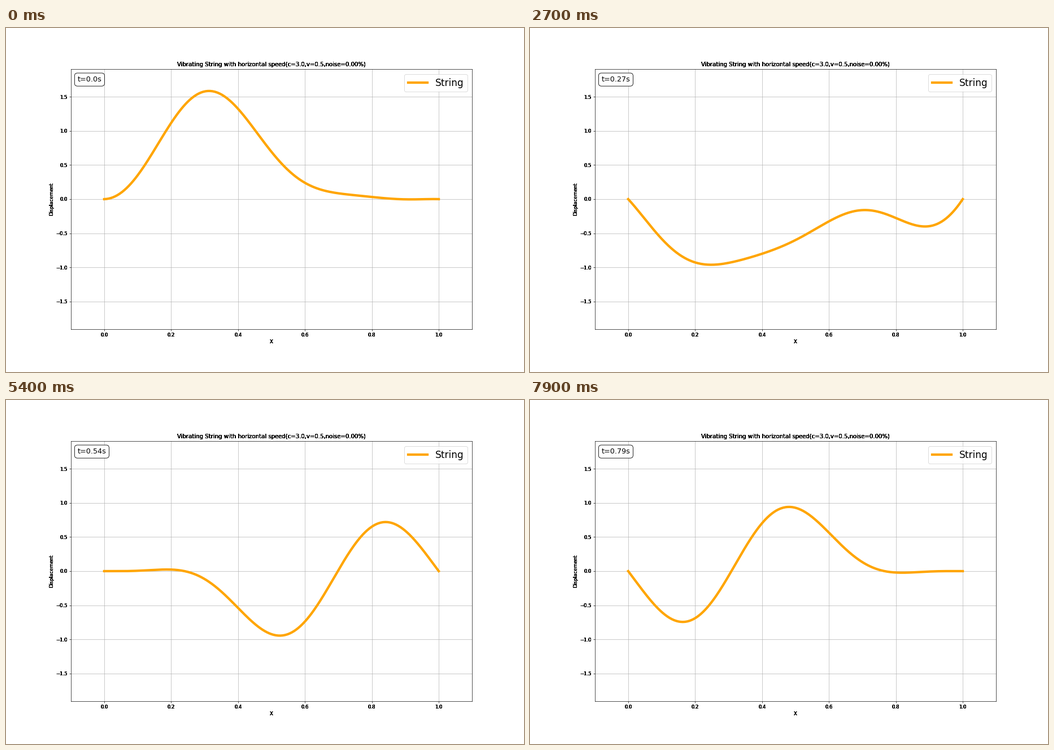
Animation, 917 px wide and 611 px high, one loop 8 s. Source, as a matplotlib script:

```python
import numpy as np
import matplotlib.pyplot as plt
from matplotlib.animation import FuncAnimation

DPI = 61.1
W, H = 917, 611
FRAMES, INTERVAL = 80, 100

C = 3.0               # wave speed
BETA = 0.5            # transport speed as a fraction of C
AMPS = (1.008, 0.971, 0.314)
Y_MAX = 1.905

plt.rcParams["font.family"] = "DejaVu Sans"


def string(x, t):
    """Sum of the first modes of a string moving along its axis."""
    phase = np.pi * (C * (1 - BETA**2) * t + BETA * x - 0.25)
    return sum(a * np.sin(n * np.pi * x) * np.cos(n * phase)
               for n, a in enumerate(AMPS, 1))


def harden(label, times=6):
    """Draw a label repeatedly so its soft edges turn dark."""
    draw = label.draw

    def redraw(renderer):
        for _ in range(times):
            draw(renderer)

    label.draw = redraw


fig = plt.figure(figsize=((W + 0.01) / DPI, (H + 0.01) / DPI), dpi=DPI,
                 facecolor="white")
ax = fig.add_subplot()
fig.subplots_adjust(left=0.125, right=0.9, bottom=0.125, top=0.88)
ax.set_xlim(-0.1, 1.1)
ax.set_ylim(-Y_MAX, Y_MAX)
ax.set_xticks(np.linspace(0, 1, 6))
ax.set_yticks(np.linspace(-1.5, 1.5, 7))
ax.grid(True)
ax.set_title("Vibrating String with horizontal speed"
             "(c=3.0,v=0.5,noise=0.00%)", fontsize=12)
ax.set_xlabel("X")
ax.set_ylabel("Displacement")

for label in (ax.title, ax.xaxis.label, ax.yaxis.label,
              *ax.get_xticklabels(), *ax.get_yticklabels()):
    harden(label)

xs = np.linspace(0, 1, 301)
line, = ax.plot(xs, string(xs, 0), color="orange", lw=5, label="String")
ax.legend(loc="upper right", fontsize=20)
clock = ax.text(-0.08, 1.725, "t=0.0s", fontsize=15,
                bbox=dict(boxstyle="round,pad=0.4", fc="white", ec="black"))


def update(i):
    t = round(i / 100, 2)
    line.set_ydata(string(xs, t))
    clock.set_text(f"t={t}s")
    return line, clock


anim = FuncAnimation(fig, update, frames=FRAMES, interval=INTERVAL,
                     repeat=True, repeat_delay=0)
plt.show()
```
